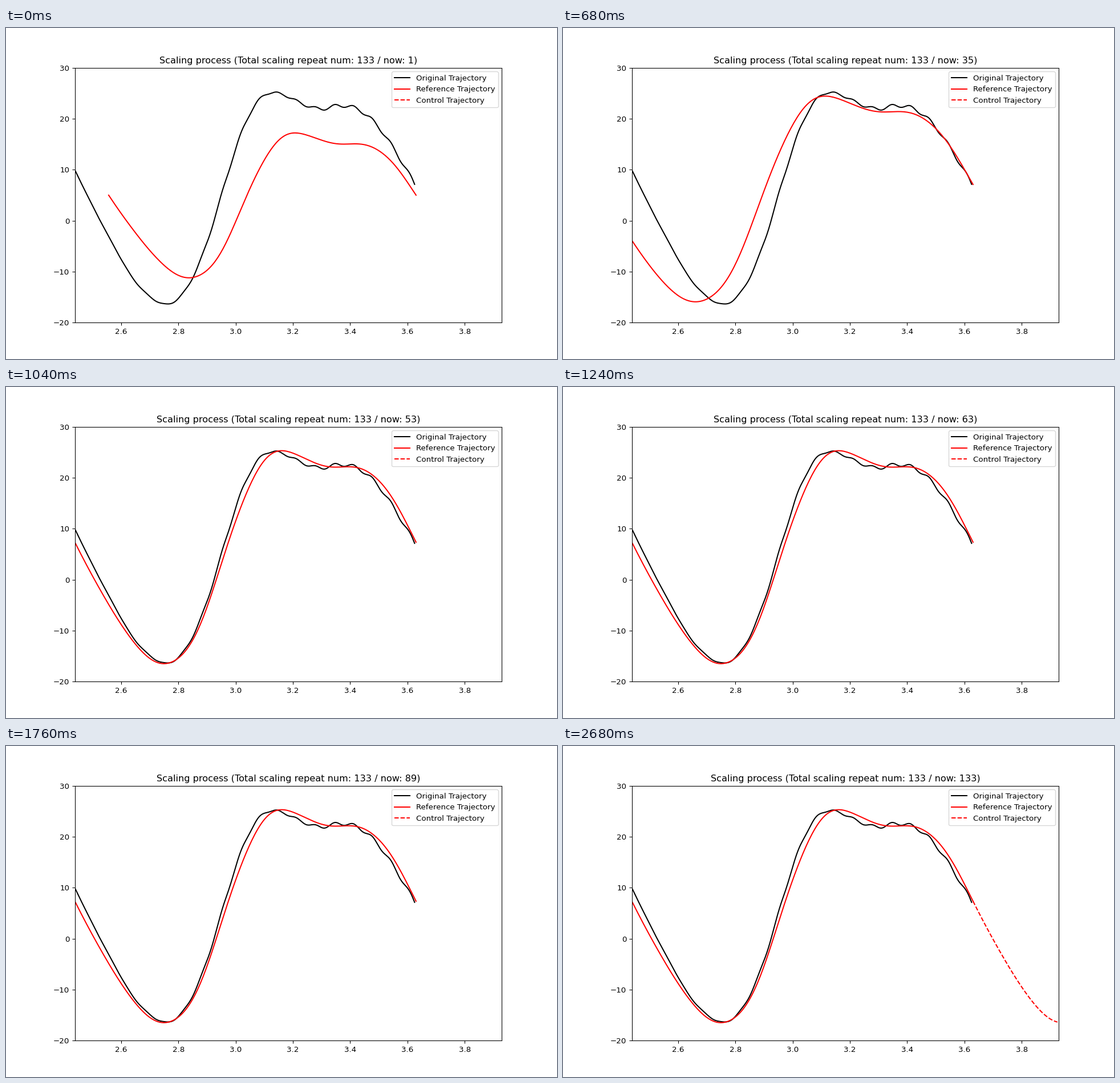
Animation of 966 by 580 pixels, one loop 3.28 s. Source, as a matplotlib script:

```python
import matplotlib.pyplot as plt
import numpy as np
from matplotlib.animation import FuncAnimation

W, H, DPI = 966, 580, 96.6
NOW, PAST, AHEAD, STEP = 3.63, 1.192, 0.3, 0.005
BASE_LEN = 1.074            # duration of the unscaled reference
TOTAL = 133                 # scaling trials
FRAMES, INTERVAL = 82, 40
CONTROL_FRAME = 67          # the control curve appears here

# Evenly spaced heights: one reference period, and the measured run.
REFERENCE = np.array([5, -0.4, -5.23, -9.14, -11.16, -10.1, -5.17, 3.26,
                      11.21, 16.26, 17.09, 15.9, 15.04, 15.05, 13.87, 10.39])
MEASURED = np.array([9.95, 2.45, -4.52, -10.9, -14.97, -16.33, -12.8, -4.28, 7.96,
                     18.88, 24.55, 24.75, 23, 21.92, 22.57, 21.84, 18.76, 13.5, 7.12])
RIPPLE = 0.4

# Line searches alternate between time and amplitude. Each one begins with
# the same bracketing probes, then settles on the change it found.
SEARCH_STARTS = (2, 17, 27, 42, 53, 70, 92, 114)
FOUND = (-0.002, 0.42, 0.112, 0.05)
GOLD = (5 ** 0.5 + 1) / 2
PROBES = (0, 1, -GOLD, 0, 1 - GOLD, 2 - GOLD)
OVERSHOOT_STEP = 8


def reference_wave(u):
    """Periodic reference at phase u, where 0 is now and -1 one period ago."""
    coef = np.fft.rfft(REFERENCE) / len(REFERENCE)
    coef[1:-1] *= 2
    return np.exp(2j * np.pi * np.outer(u, np.arange(len(coef)))).dot(coef).real


def measured_curve(count=600):
    """Cubic curve through the measured heights with a growing sensor ripple."""
    last = len(MEASURED) - 1
    k = np.linspace(0, last, count)
    i = np.minimum(k.astype(int), last - 1)
    s = k - i
    slope = np.gradient(MEASURED, edge_order=2)
    y = ((1 + 2 * s) * (1 - s) ** 2 * MEASURED[i] + s * (1 - s) ** 2 * slope[i]
         + s * s * (3 - 2 * s) * MEASURED[i + 1] + s * s * (s - 1) * slope[i + 1])
    y -= RIPPLE * k / last * np.sin(2 * np.pi * k)
    return np.linspace(NOW - PAST, NOW - STEP, count), y


def scaled(u, scale):
    time, amp = scale
    return NOW + time * BASE_LEN * u, amp * reference_wave(u)


def scale_at(trial):
    """Time and amplitude scale tried at the given trial."""
    scale = [1.0, 1.0]
    ends = SEARCH_STARTS[1:] + (TOTAL + 1,)
    for i, (start, end) in enumerate(zip(SEARCH_STARTS, ends)):
        if trial < start:
            break
        axis, step = i % 2, trial - start
        change = FOUND[i] if i < len(FOUND) else 0
        if trial < end:
            if step < len(PROBES):
                change = PROBES[step]
            elif step == OVERSHOOT_STEP and axis == 0:
                change *= 2
        scale[axis] += change
    return scale


# The small margin keeps the pixel size from rounding down.
fig, ax = plt.subplots(figsize=((W + 1e-6) / DPI, (H + 1e-6) / DPI), dpi=DPI)
ax.set(xlim=(NOW - PAST, NOW + AHEAD), ylim=(-20, 30))
ax.plot(*measured_curve(), "k", label="Original Trajectory")
reference, = ax.plot([], [], "r", label="Reference Trajectory")
control, = ax.plot([], [], "r--", label="Control Trajectory")
ax.legend(loc="best")
title = ax.set_title("")

PERIOD = np.linspace(-1, 0, 240)


def update(frame):
    trial = min(1 + 2 * frame, TOTAL)
    scale = scale_at(trial)
    reference.set_data(*scaled(PERIOD, scale))
    if frame >= CONTROL_FRAME:
        horizon = (AHEAD - STEP) / (scale[0] * BASE_LEN)
        control.set_data(*scaled(np.linspace(0, horizon, 60), scale))
    else:
        control.set_data([], [])
    title.set_text(f"Scaling process (Total scaling repeat num: {TOTAL} / now: {trial})")
    return reference, control, title


anim = FuncAnimation(fig, update, frames=FRAMES, interval=INTERVAL, repeat=True)
plt.show()
```
